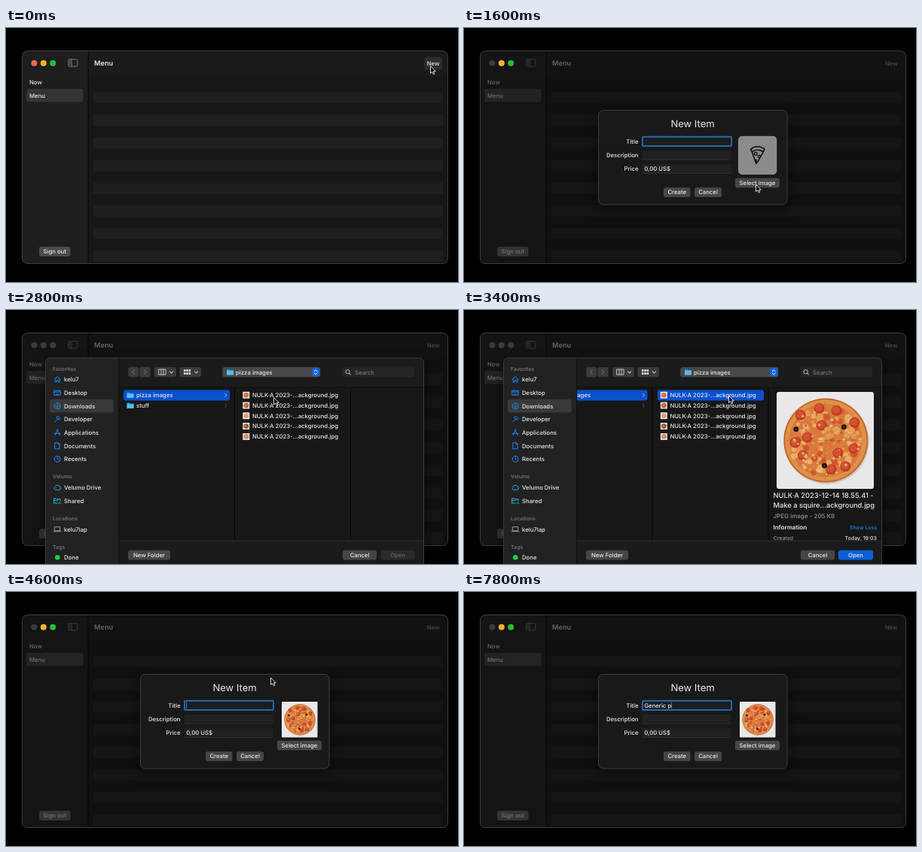
Recreate the animation shown at these times as an HTML page. Size 600 by 338 pixels, loop 8 s.

```html
<!DOCTYPE html>
<html lang="en">
<head>
<meta charset="utf-8">
<title>Menu editor</title>
<style>
  html, body { margin: 0; width: 100%; height: 100%; overflow: hidden; background: #000; }
  svg { display: block; width: 100%; height: 100%; }
  text { font-family: Inter, "Open Sans", sans-serif; font-size: 7.75px; font-weight: 500; fill: #e8e8e8; text-rendering: geometricPrecision; white-space: pre; }
</style>
</head>
<body>
<svg id="stage" viewBox="0 0 600 338"></svg>
<script>
const LOOP = 8000, STEP = 200;
const TITLE = 'Generic p';

// Markup helpers
const rect = (x, y, w, h, fill, r = 0, more = '') =>
  `<rect x="${x}" y="${y}" width="${w}" height="${h}" rx="${r}" fill="${fill}" ${more}/>`;
const circle = (x, y, r, fill, more = '') => `<circle cx="${x}" cy="${y}" r="${r}" fill="${fill}" ${more}/>`;
const line = (d, color, width = 1, more = '') =>
  `<path d="${d}" fill="none" stroke="${color}" stroke-width="${width}" stroke-linecap="round" stroke-linejoin="round" ${more}/>`;
const label = (x, y, s, style = '', anchor = 'start') =>
  `<text x="${x}" y="${y}" text-anchor="${anchor}" style="${style}">${s}</text>`;
const group = (id, body, more = '') => `<g id="${id}" ${more}>${body}</g>`;
const button = (x, y, w, s, fill = '#464646', color = '#e8e8e8') =>
  rect(x, y, w, 12.8, fill, 2.8) + label(x + w / 2, y + 9, s, `fill:${color}`, 'middle');
const list = (n, make) => Array.from({ length: n }, (_, i) => make(i)).join('');

// Small repeatable generator for the pizza toppings
function random(seed) {
  return () => (seed = (seed * 16807) % 2147483647) / 2147483647;
}

function pizzaSymbol() {
  const rnd = random(77);
  const spot = (max, draw) => {
    const a = rnd() * Math.PI * 2, d = Math.sqrt(rnd()) * max;
    return draw((Math.cos(a) * d).toFixed(1), (Math.sin(a) * d).toFixed(1));
  };
  const pepperoni = [[-33, -34], [15, -40], [39, -24], [-24, -4], [-30, 20], [17, 17], [38, 11], [-5, -20], [8, 39], [-8, -43], [-40, 3], [27, 35]];
  const olives = [[-39, -15], [25, -18], [-1, 34]];
  return `<symbol id="pizza" viewBox="-65 -65 130 130" overflow="visible">`
    + rect(-65, -65, 130, 130, '#e9e7e8', 3)
    + circle(2, 2, 56.5, '#a89a94', 'opacity=".4"') + circle(0.8, 0, 56.5, '#c4682c')
    + circle(0.8, 0, 54.5, '#dd9148') + circle(0.8, 0, 49, '#da7a3c')
    + list(110, () => spot(47, (x, y) => circle(x, y, 1.5 + rnd() * 3.5, ['#ecbd72', '#e6a45a', '#cf4a28'][Math.floor(rnd() * 3)], 'opacity=".75"')))
    + pepperoni.map(([x, y]) => circle(x, y, 7, '#c23a22') + circle(x - 0.8, y - 0.8, 5, '#d35232')).join('')
    + list(45, () => spot(47, (x, y) => circle(x, y, 0.8 + rnd() * 1.8, '#efc983', 'opacity=".8"')))
    + line('M0-52V52M-52 0H52M-37-37L37 37M37-37L-37 37', '#b04e28', 0.7, 'opacity=".5"')
    + olives.map(([x, y]) => circle(x, y, 3.5, '#1b1514') + circle(x, y, 0.9, '#6b5148')).join('')
    + '</symbol>';
}
const pizza = (x, y, size) => `<use href="#pizza" x="${x}" y="${y}" width="${size}" height="${size}"/>`;

function windowLayer() {
  const frame = (fill, more) => rect(21.5, 30.5, 565, 283, fill, 7, more);
  const rows = list(8, i => rect(115.5, (85 + i * 30.15).toFixed(1), 464.5, 15.3, '#1f1f1f', 2.5));
  const sidebar = rect(21.5, 30.5, 88, 283, '#1e1e1f') + rect(27, 81, 75.5, 17.5, '#343435', 3);
  const texts = label(117, 50, 'Menu', 'font-size:9.2px;font-weight:600')
    + label(31, 75.2, 'Now') + label(31, 92.9, 'Menu') + label(64.7, 300, 'Sign out', '', 'middle');
  const icon = line('M84 41.7H93.5Q94.8 41.7 94.8 43V49.8Q94.8 51 93.5 51H84Q82.8 51 82.8 49.8V43Q82.8 41.7 84 41.7M87 41.7V51M84.2 44H85.6M84.2 46H85.6M84.2 48H85.6', '#929292', 0.8);
  return `<g clip-path="url(#windowClip)">` + frame('#181718') + rect(110, 31, 477, 32, '#1b1b1b')
    + sidebar + rect(108.6, 31, 1, 283, '#080808') + rows + rect(44, 291, 41.5, 13, '#4b4b4c', 3)
    + group('newButton', rect(555.5, 38.5, 23.5, 17, '#2d2d2d', 3))
    + group('newText', label(567, 49.6, 'New', '', 'middle')) + group('windowText', texts + icon)
    + group('dim', frame('#000'), 'opacity="0"') + '</g>'
    + frame('none', 'stroke="#454545" stroke-width=".9"')
    + ['red', 'yellow', 'green'].map((id, i) => circle(37.4 + i * 12.4, 46.8, 4, '#444', `id="${id}"`)).join('');
}

function dialogLayer() {
  const field = y => rect(237, y, 117.5, 12.3, '#212121') + rect(237, y + 11.8, 117.5, 0.6, '#3a3a3a');
  const slice = line('M380.5 161.3Q389 154.5 399 160.8L397.5 164.5Q389 160 382.3 164.8ZM382.3 164.8L387.8 180.5 390.5 177 397.5 164.5M388 180.5V175', '#080808', 1.5)
    + circle(387.3, 167.3, 1.9, 'none', 'stroke="#080808" stroke-width="1.2"')
    + circle(391.8, 170.8, 1.6, 'none', 'stroke="#080808" stroke-width="1.2"');
  return group('dialog',
    rect(178.5, 109.5, 250.5, 125.5, '#19191a', 6, 'stroke="#454545" stroke-width=".9" filter="url(#shadow)"')
    + label(303.5, 132.2, 'New Item', 'font-size:13px;font-weight:400', 'middle')
    + label(231.5, 153.6, 'Title', '', 'end') + label(231.5, 171.8, 'Description', '', 'end') + label(231.5, 190, 'Price', '', 'end')
    + rect(237, 144.8, 118, 12.2, '#1c1d1f', 1, 'stroke="#2469ae" stroke-width="1.9"')
    + field(163) + field(181.3) + label(239.3, 190, '0,00 US$')
    + '<text id="title" x="239.3" y="153.6"></text>' + rect(239.3, 146.4, 0.9, 9, '#3f83cd', 0, 'id="caret"')
    + group('placeholder', rect(364.5, 144.3, 50.3, 50.3, '#8c8a8e', 4.5, 'stroke="#a19fa3" stroke-width=".8"') + slice)
    + group('photo', pizza(366, 146, 47.5))
    + group('selectButton', button(360, 199.7, 59, 'Select image'))
    + button(265, 212.2, 35.5, 'Create') + button(306, 212.2, 36, 'Cancel'));
}

function sidebarLayer() {
  const blue = '#168cf5', cyan = '#20b8dc';
  const items = [
    [95, 'kelu7', 'M-4 0L0-3.7 4 0M-3-.5V3.7H-1V1H1V3.7H3V-.5', blue],
    [113, 'Desktop', 'M-4-3H4V3H-4ZM-4-1.2H4M-1.5 1.8H1.5', blue],
    [130.6, 'Downloads', 'M-4 0A4 4 0 1 1 4 0A4 4 0 1 1-4 0M0-2V2M-1.7.4L0 2 1.7.4', blue],
    [148.2, 'Developer', 'M-3.5 3.5L1-1M-1.5-2.5L1-4 4-1 2.5.5Z', blue],
    [165.8, 'Applications', 'M-3.3 3.5L.8-4M-.8-4L3.3 3.5M-4 1.3H4', blue],
    [183.5, 'Documents', 'M-3-4H1L3-2V4H-3ZM1-4V-2H3', blue],
    [201.1, 'Recents', 'M-4 0A4 4 0 1 1 4 0A4 4 0 1 1-4 0M0-2.5V0L1.8 1', blue],
    [239, 'Velumo Drive', 'M-2.8 3A2.3 2.3 0 0 1-2.8-1.2A3 3 0 0 1 2.6-1.4A2.3 2.3 0 0 1 3 3Z', cyan],
    [256.5, 'Shared', 'M-4.5 3.3V-3H-1.5L-.5-2H4V0M-4.5-.5H1M-4.5 3.3H0M3 1.2V1.3M1.4 3.6Q3 1.7 4.8 3.6', cyan],
    [294.5, 'kelu7lap', 'M-3.5-3H3.5V2H-3.5ZM-5 3H5', '#98989a']
  ];
  const headings = [[80.6, 'Favorites'], [224.4, 'Velumo'], [280, 'Locations'], [318, 'Tags']];
  return rect(53, 64, 96.5, 280, '#222223') + rect(58, 118.8, 84.7, 17.6, '#39393a', 3.5)
    + headings.map(([y, s]) => label(62, y, s, 'font-size:7px;font-weight:600;fill:#707072')).join('')
    + items.map(([y, s, d, color]) => label(77, y, s) + line(d, color, 1, `transform="translate(68.2 ${y - 2.8})"`)).join('')
    + label(77, 332, 'Done') + circle(68.3, 329.3, 3.3, '#1fce42');
}

function toolbarLayer() {
  const chevron = (x, y) => line(`M${x - 2} ${y - 1}L${x} ${y + 1} ${x + 2} ${y - 1}`, '#c8c8c8', 1.1);
  return rect(162.3, 76, 14, 13.3, '#3b3b3c', 2.5) + rect(177.3, 76, 14.3, 13.3, '#3b3b3c', 2.5)
    + line('M170.3 80L167.7 82.7 170.3 85.4M183.3 80L185.9 82.7 183.3 85.4', '#666667', 1.1)
    + rect(197, 76, 29, 13.3, '#3b3b3c', 3) + line('M203 79H212V86H203ZM206 79V86M209 79V86', '#d0d0d0', 0.9) + chevron(219.5, 82.8)
    + rect(230.3, 76, 28.7, 13.3, '#3b3b3c', 3)
    + list(6, i => rect(235.9 + (i % 3) * 3.3, 78.9 + Math.floor(i / 3) * 4.2, 2.6, 3, '#d0d0d0', 0.4)) + chevron(252.5, 82.8)
    + rect(287.3, 76, 130, 13.3, '#48484a', 3) + folder(297.5, 82.7) + label(305, 85.7, 'pizza images')
    + rect(406.3, 77.2, 9.8, 11, '#1764dc', 2.3) + line('M409.3 81.5L411.2 79.7 413.1 81.5M409.3 84L411.2 85.8 413.1 84', '#fff', 1)
    + rect(446.5, 76.3, 95.5, 13, '#252526', 2.8)
    + circle(453.6, 82.2, 2.7, 'none', 'stroke="#d5d5d5" stroke-width=".9"') + line('M455.7 84.3L457.6 86.2', '#d5d5d5', 1)
    + label(463, 85.8, 'Search', 'fill:#77777a');
}

function folder(x, y) {
  return `<path d="M${x - 4.5} ${y - 3.7}h3.2l1 1h4.8v6.4h-9z" fill="#2f9bd8"/>` + rect(x - 4.5, y - 1.6, 9, 5.2, '#54bdf0', 0.6);
}

function columnsLayer() {
  const arrow = (y, color) => line(`M291 ${y - 1.8}L292.8 ${y} 291 ${y + 1.8}`, color, 0.9);
  const tones = ['#d86a3c', '#c65a35', '#d9a276', '#9b4a34', '#d08a62'];
  const files = tones.map((tone, i) => {
    const y = 113.2 + i * 13.8;
    return rect(314.3, y - 4.5, 9, 9, '#e8e3df', 0.5) + circle(318.8, y, 3.3, tone) + circle(318.3, y - 0.4, 1.5, '#e9a068', 'opacity=".6"')
      + label(327, y + 2.8, 'NULK·A 2023-...ackground.jpg');
  }).join('');
  return group('columns',
    rect(156, 106.6, 141, 13.8, '#0b51cd', 2.8) + folder(165, 113.4) + label(173, 116, 'pizza images') + arrow(113.4, '#e0e0e0')
    + folder(165, 127.2) + label(173, 129.8, 'stuff') + arrow(127.2, '#69696b')
    + rect(303, 103, 1, 204, '#060606') + rect(457, 103, 1, 204, '#060606')
    + group('fileSelection', rect(310.5, 106.6, 141, 13.8, '#0b51cd', 2.8)) + files);
}

function previewLayer() {
  const gray = 'fill:#929294;';
  return group('preview', pizza(415, 109, 129)
    + label(410.5, 249.5, 'NULK·A 2023-12-14 18.55.41 -', 'font-size:9.3px') + label(410.5, 263, 'Make a squire...ackground.jpg', 'font-size:9.3px')
    + label(410.5, 276.8, 'JPEG image - 205 KB', gray + 'font-size:8px')
    + label(410.5, 292.3, 'Information', 'font-weight:600;font-size:8px') + label(548, 292.3, 'Show Less', 'font-size:7px;fill:#1687f2', 'end')
    + label(410.5, 306, 'Created', gray + 'font-size:7px') + label(548, 306, 'Today, 19:03', 'font-size:7px', 'end'));
}

function pickerLayer() {
  const outline = (fill, more) => rect(52.5, 63.8, 502, 290, fill, 6, more);
  return group('picker', outline('#1b1b1c', 'filter="url(#shadow)"')
    + `<g clip-path="url(#pickerClip)">` + rect(150, 103, 405, 204, '#171718') + sidebarLayer() + toolbarLayer()
    + rect(149.3, 64, 0.9, 280, '#0c0c0c') + rect(150, 102.6, 405, 0.9, '#0b0b0b') + rect(150, 306.8, 405, 0.8, '#343435')
    + `<g clip-path="url(#browserClip)">${columnsLayer()}${previewLayer()}</g>`
    + button(162, 319.8, 56, 'New Folder') + button(447, 319.8, 45, 'Cancel')
    + group('openDisabled', button(497, 319.8, 46, 'Open', '#2a2a2b', '#69696b'))
    + group('openEnabled', button(497, 319.8, 46, 'Open', '#0b60d8')) + '</g>'
    + outline('none', 'stroke="#414142" stroke-width=".9"'));
}

const stage = document.getElementById('stage');
const clip = (id, ...box) => `<clipPath id="${id}">${rect(...box)}</clipPath>`;
stage.innerHTML = '<defs>' + clip('windowClip', 21.5, 30.5, 565, 283, '#000', 7)
  + clip('pickerClip', 52.5, 63.8, 502, 290, '#000', 6) + clip('browserClip', 150, 103.5, 404, 203.3, '#000')
  + '<filter id="shadow" x="-20%" y="-20%" width="140%" height="150%" color-interpolation-filters="sRGB"><feDropShadow dx="0" dy="5" stdDeviation="8" flood-color="#000" flood-opacity=".55"/></filter>'
  + pizzaSymbol() + '</defs>' + rect(0, 0, 600, 338, '#000') + windowLayer() + dialogLayer() + pickerLayer()
  + group('arrow', '<path d="M0 0V9.4L2.2 7.5 3.7 10.8 5.3 10.1 3.9 6.9H6.8Z" fill="#080808" stroke="#f2f2f2" stroke-width=".9" stroke-linejoin="round"/>')
  + group('beam', [['#f2f2f2', 2.4], ['#111', 0.9]].map(([c, w]) => line('M-2.2-4.5Q0-4.5 0-3.2Q0-4.5 2.2-4.5M0-3.2V3.2M-2.2 4.5Q0 4.5 0 3.2Q0 4.5 2.2 4.5', c, w)).join(''));

const el = id => document.getElementById(id);
const set = (id, name, value) => el(id).setAttribute(name, value);
const show = (id, on) => set(id, 'opacity', Number(on));
const ramp = (t, from, to) => Math.min(1, Math.max(0, (t - from) / (to - from)));
const ease = p => p * p * (3 - 2 * p);

// Pointer stops: time, x, y
const stops = [[0, 563.5, 50.8], [600, 563.5, 50.8], [1400, 387.5, 208.3], [2000, 387.5, 208.3], [2800, 355.5, 116.5],
  [3200, 351.5, 114], [4800, 351.5, 114], [5800, 300.3, 153]];

function pointerAt(t) {
  const next = stops.findIndex(s => s[0] > t);
  if (next < 0) return stops[stops.length - 1].slice(1);
  const [t0, x0, y0] = stops[next - 1], [t1, x1, y1] = stops[next], p = ease(ramp(t, t0, t1));
  return [x0 + (x1 - x0) * p, y0 + (y1 - y0) * p];
}

function render(time) {
  const t = Math.floor((time % LOOP) / STEP) * STEP;
  const dialog = ramp(t, 200, 600);
  const picker = ramp(t, 1600, 2000) * (1 - ramp(t, 4000, 4400));
  const picking = picker > 0, chosen = t >= 4200, selected = t >= 3000;
  const slide = ease(ramp(t, 2800, 3400));

  show('dim', dialog * 0.32);
  show('windowText', 1 - dialog * 0.4);
  show('newText', 1 - dialog * 0.6);
  show('newButton', 1 - dialog);
  set('red', 'fill', dialog ? '#3b3b3c' : '#ed6a50');
  set('yellow', 'fill', picking ? '#3b3b3c' : '#f6b32a');
  set('green', 'fill', picking ? '#3b3b3c' : '#26bd3b');

  show('dialog', dialog);
  show('placeholder', !chosen);
  show('photo', chosen);
  set('selectButton', 'transform', `translate(0 ${chosen ? -2 : 0})`);

  show('picker', picker);
  set('columns', 'transform', `translate(${-53.5 * slide} 0)`);
  show('fileSelection', selected);
  show('preview', slide === 1);
  show('openDisabled', !selected);
  show('openEnabled', selected);

  const typed = Math.max(0, Math.floor((t - 6400) / 155));
  const title = el('title');
  title.textContent = TITLE.slice(0, typed);
  set('caret', 'x', 239.3 + (typed ? title.getComputedTextLength() : 0));
  show('caret', typed || (t >= 4400 ? (t - 4400) % 1200 < 600 : (t - 600) % 1000 < 600 && t < 1600));

  const [x, y] = pointerAt(t);
  const overField = chosen && x < 350 && y > 144;
  for (const id of ['arrow', 'beam']) set(id, 'transform', `translate(${x} ${y})`);
  show('arrow', !typed && !overField);
  show('beam', !typed && overField);
}

function tick() {
  render(performance.now());
  requestAnimationFrame(tick);
}
tick();
</script>
</body>
</html>
```
